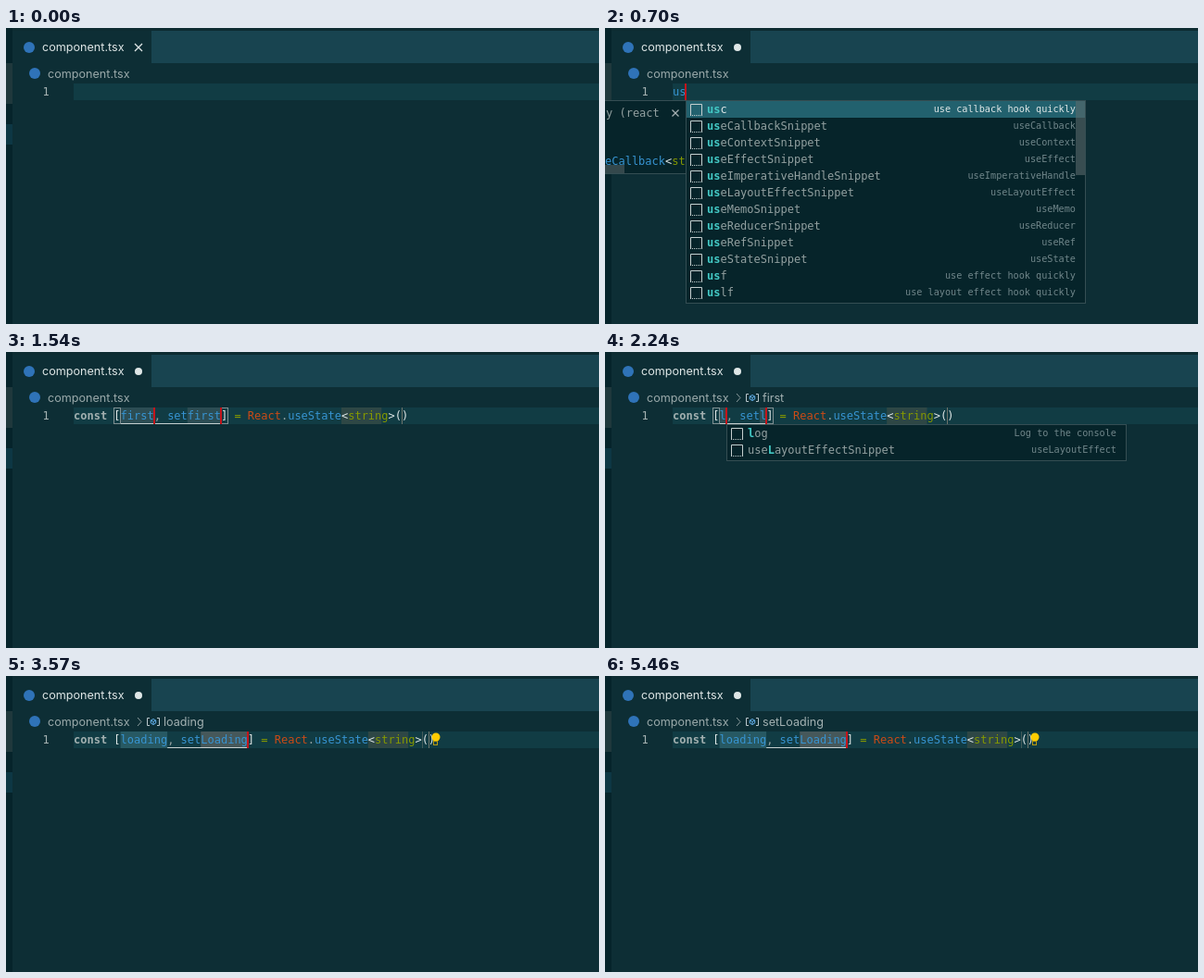
Animation of 640 by 320 pixels, one loop 5.74 s. Source, as an HTML page with a canvas:

```html
<!DOCTYPE html>
<html lang="en">
<head>
<meta charset="utf-8">
<title>Snippet completion</title>
<style>
html, body { margin: 0; width: 100%; height: 100%; overflow: hidden; background: #0d2e35; }
canvas { display: block; width: 640px; height: 320px; }
</style>
</head>
<body>
<canvas id="stage" width="640" height="320"></canvas>
<script>
const ctx = document.getElementById('stage').getContext('2d');
const LOOP = 5740;
const CW = 7.224;
const LEFT = 73;
const MONO = '"DejaVu Sans Mono", monospace';
const UI = '12.6px Inter, "Open Sans", sans-serif';
const C = {
  editor: '#0d2e35', side: '#06242b', bar: '#184450', line: '#113c44',
  panel: '#06242a', border: '#354e53', row: '#22616e', scroll: '#34484c',
  grey: '#93a1a1', dim: '#70868a', white: '#dfe7e7', blue: '#3794d2',
  green: '#859900', orange: '#cb4b16', cyan: '#43c9c5', red: '#c4141b',
  purple: '#b180d7', logo: '#2f73b8'
};

const US = [
  ['usc', 'use callback hook quickly'],
  ['useCallbackSnippet', 'useCallback'],
  ['useContextSnippet', 'useContext'],
  ['useEffectSnippet', 'useEffect'],
  ['useImperativeHandleSnippet', 'useImperativeHandle'],
  ['useLayoutEffectSnippet', 'useLayoutEffect'],
  ['useMemoSnippet', 'useMemo'],
  ['useReducerSnippet', 'useReducer'],
  ['useRefSnippet', 'useRef'],
  ['useStateSnippet', 'useState'],
  ['usf', 'use effect hook quickly'],
  ['uslf', 'use layout effect hook quickly']
];
const USS = [
  ['uss', 'use state hook quickly'],
  ['useStateSnippet', 'useState'],
  ['useState', 'react'],
  ['useSyncExternalStore', 'react'],
  ['useRefSnippet', 'useRef'],
  ['useMemoSnippet', 'useMemo'],
  ['useEffectSnippet', 'useEffect'],
  ['useContextSnippet', 'useContext'],
  ['useReducerSnippet', 'useReducer'],
  ['useCallbackSnippet', 'useCallback'],
  ['useInsertionEffect', 'react'],
  ['useTransition', 'react']
];
const LOG = [
  ['log', 'Log to the console'],
  ['useLayoutEffectSnippet', 'useLayoutEffect']
];

const col = n => LEFT + n * CW;

function rect(x, y, w, h, color) {
  ctx.fillStyle = color;
  ctx.fillRect(x, y, w, h);
}

function frame(x, y, w, h, color) {
  ctx.strokeStyle = color;
  ctx.lineWidth = 1;
  ctx.strokeRect(x + 0.5, y + 0.5, w - 1, h - 1);
}

function disc(x, y, r, color) {
  ctx.fillStyle = color;
  ctx.beginPath();
  ctx.arc(x, y, r, 0, Math.PI * 2);
  ctx.fill();
}

function path(points, color, width = 1) {
  ctx.strokeStyle = color;
  ctx.lineWidth = width;
  ctx.beginPath();
  points.forEach(([x, y], i) => i ? ctx.lineTo(x, y) : ctx.moveTo(x, y));
  ctx.stroke();
}

function text(str, x, y, color, font, align = 'left') {
  ctx.font = font;
  ctx.fillStyle = color;
  ctx.textAlign = align;
  ctx.fillText(str, x, y);
}

function mono(str, x, y, color, bold) {
  text(str, x, y, color, (bold ? 'bold ' : '') + '12px ' + MONO);
}

// Draws [string, color, bold] runs on the character grid.
function runs(list, x, y) {
  for (const [str, color, bold] of list) {
    mono(str, x, y, color, bold);
    x += str.length * CW;
  }
}

function cross(x, y, r, color) {
  path([[x - r, y - r], [x + r, y + r]], color, 1.2);
  path([[x - r, y + r], [x + r, y - r]], color, 1.2);
}

function cube(x, y, r, color) {
  const h = r * 0.5, w = r * 0.9;
  path([[x, y - r], [x + w, y - h], [x + w, y + h], [x, y + r],
    [x - w, y + h], [x - w, y - h], [x, y - r]], color);
  path([[x - w, y - h], [x, y], [x + w, y - h]], color);
  path([[x, y], [x, y + r]], color);
}

function snippetIcon(x, y) {
  const color = '#c5cfcf';
  path([[x + 0.5, y + 12], [x + 0.5, y + 0.5], [x + 12.5, y + 0.5], [x + 12.5, y + 12]], color);
  for (let i = 0; i < 13; i += 2) rect(x + i, y + 12, 1, 1, color);
}

function chrome(s) {
  rect(0, 0, 640, 320, C.editor);
  rect(0, 0, 640, 3, '#0d2b31');
  rect(157, 3, 483, 35, C.bar);
  rect(0, 0, 7, 320, C.side);
  rect(0, 38, 7, 44, '#1f383c');
  rect(0, 104, 7, 22, '#0d3744');
  disc(25, 21, 6, C.logo);
  text('component.tsx', 39, 25, C.white, UI);
  if (s.dirty) disc(143, 21, 4, C.white);
  else cross(143, 21, 4, C.white);

  disc(31, 49, 6, C.logo);
  text('component.tsx', 45, 54, '#9baaab', UI);
  if (s.crumb) {
    path([[142, 45], [146, 49.5], [142, 54]], '#8b9c9e');
    path([[155, 45.5], [152.5, 45.5], [152.5, 53.5], [155, 53.5]], '#b9c7cb');
    path([[163, 45.5], [165.5, 45.5], [165.5, 53.5], [163, 53.5]], '#b9c7cb');
    cube(159, 49.5, 3, '#62aee8');
    text(s.crumb, 170, 54, '#a3b1b2', UI);
  }
  rect(LEFT, 60, 567, 18, C.line);
  mono('1', 39.5, 73, '#a5b2b2');
}

function caret(n) {
  rect(Math.round(col(n)) - 1, 60, 2, 18, C.red);
}

function typed(s) {
  mono(s.word, LEFT, 73, C.blue);
  if (s.squiggle) {
    const wave = [];
    for (let x = 0; x <= s.word.length * CW; x += 2) wave.push([LEFT + x, x % 4 ? 77 : 75]);
    path(wave, '#dc4a3c');
  }
  if (s.caret) caret(s.word.length);
}

function bulb(x) {
  disc(x, 66, 4.5, '#ffcc00');
  rect(x - 2, 69, 4, 2, '#ffcc00');
  frame(x - 3, 70, 5, 5, '#b79b13');
}

function statement(s) {
  const name = s.name, n = name.length;
  const second = s.done ? name[0].toUpperCase() + name.slice(1) : name;
  const a = 7, b = a + n, c = b + 5, d = c + n;
  const type = d + 19, end = type + 9;
  const w = n * CW;

  rect(col(a), 60, w, 18, s.done ? '#275963' : '#2c4d54');
  rect(col(c), 60, w, 18, s.done ? '#46585a' : '#2c4d54');
  rect(col(type - 1), 60, 6 * CW, 18, '#2e4745');
  if (s.done) rect(col(b), 77, col(d) - col(b), 1, '#c6d0d0');
  else {
    rect(col(a), 77, col(d + 1) - col(a), 1, '#c6d0d0');
    for (const i of [a - 1, d]) frame(Math.round(col(i)), 60, 8, 18, '#809092');
  }

  runs([
    ['const', '#a2b0b0', true], [' [', C.white], [name, C.blue], [', ', C.grey],
    ['set' + second, C.blue], [']', C.white], [' = ', C.green], ['React', C.orange],
    ['.', C.grey], ['useState', C.blue], ['<', C.white], ['string', C.green],
    ['>()', C.white]
  ], LEFT, 73);

  const stop = col(end - 1);
  rect(Math.round(stop), 60, 1, 18, '#6d746b');
  if (s.done) rect(Math.round(stop - CW), 60, 1, 18, '#435b5b');
  if (s.caret) {
    if (!s.done) caret(b);
    caret(d);
  }
  if (s.bulb) bulb(Math.round(stop) + 8);
}

// Splits a label into matched and plain letters.
function label(str, query, x, y, plain) {
  let q = 0;
  runs([...str].map(ch => {
    const hit = q < query.length && ch.toLowerCase() === query[q];
    if (hit) q++;
    return [ch, hit ? C.cyan : plain, hit];
  }), x, y);
}

function list({ items, query, at, thumb }) {
  const x = Math.round(col(at)), full = items.length > 2;
  const h = full ? 220 : 40;
  rect(x, 78, 432, h, C.panel);
  items.forEach(([name, detail], i) => {
    const y = 79 + i * 18, active = full && i === 0;
    if (active) rect(x + 1, y, 430, 18, C.row);
    if (detail === 'react') cube(x + 11, y + 9, 6, C.purple);
    else snippetIcon(x + 5, y + 3);
    label(name, query, x + 23, y + 13, active ? C.white : C.grey);
    text(detail, x + 421, y + 12, active ? C.white : C.dim, '10.2px ' + MONO, 'right');
  });
  if (thumb) rect(x + 421, 79, 10, thumb, 'rgba(90,105,108,.6)');
  frame(x, 78, 432, h, C.border);
}

function docs({ right, title, code, bar }) {
  rect(0, 78, right, 80, C.panel);
  ctx.save();
  ctx.beginPath();
  ctx.rect(0, 78, right, 80);
  ctx.clip();
  mono(title, 1, 96, C.grey);
  cross(right - 11, 92, 3.5, '#a5b0b2');
  runs(code, right - 94 + (right < 90 ? 7 : 0), 148);
  rect(0, 148, bar, 9, C.scroll);
  ctx.restore();
  path([[0, 78.5], [right, 78.5]], C.border);
  path([[0, 157.5], [right, 157.5]], C.border);
}

const usDocs = {
  right: 87, title: 'y (react', bar: 21,
  code: [['eCallback', C.blue], ['<', C.white], ['st', C.green]]
};
const ussDocs = {
  right: 95, title: '(react-ho', bar: 52,
  code: [['useState', C.blue], ['<', C.white], ['stri', C.green]]
};
const usList = { items: US, query: 'us', at: 2, thumb: 80 };
const ussList = { items: USS, query: 'uss', at: 3, thumb: 176 };
const logList = query => ({ items: LOG, query, at: 7 + query.length });

// Each step changes only the listed parts of the state.
const steps = [
  [0, { word: '' }],
  [140, { caret: true }],
  [560, { word: 'u', dirty: true }],
  [630, { word: 'us', list: usList }],
  [700, { docs: usDocs }],
  [840, { word: 'uss' }],
  [910, { list: ussList, docs: ussDocs }],
  [1190, { squiggle: true }],
  [1260, { name: 'first', list: null, docs: null }],
  [1820, { crumb: 'first', caret: false }],
  [2240, { name: 'l', caret: true, list: logList('l') }],
  [2310, { name: 'lo', list: logList('lo') }],
  [2380, { name: 'loa', list: { ...logList('lo'), at: 10 } }],
  [2450, { name: 'load', list: null }],
  [2590, { name: 'loadi' }],
  [2730, { name: 'loadin' }],
  [2870, { name: 'loading' }],
  [3290, { done: true }],
  [3430, { crumb: 'loading' }],
  [3570, { bulb: true }],
  [3710, { crumb: 'setLoading' }],
  [3850, { caret: false }],
  [4410, { caret: true }],
  [4900, { caret: false }],
  [5460, { caret: true }]
];

function stateAt(t) {
  return Object.assign({}, ...steps.filter(([at]) => at <= t).map(([, part]) => part));
}

function draw() {
  const s = stateAt((performance.now() - start) % LOOP);
  chrome(s);
  if (s.name) statement(s);
  else typed(s);
  if (s.docs) docs(s.docs);
  if (s.list) list(s.list);
  requestAnimationFrame(draw);
}

const start = performance.now();
draw();
</script>
</body>
</html>
```
